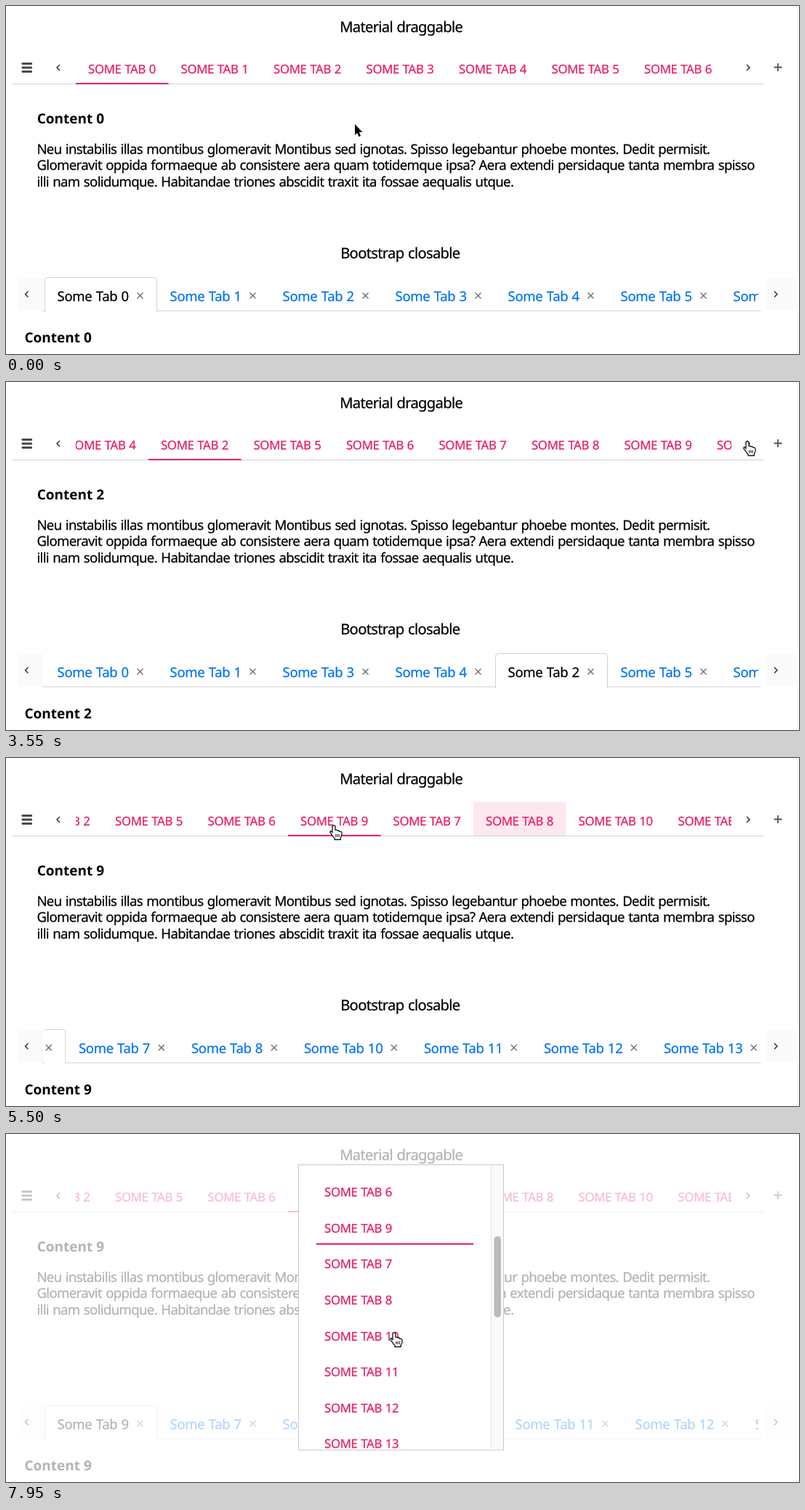
Animation of 1091x480 px, one loop 8 s. Source, as an HTML page with a canvas:

```html
<!DOCTYPE html>
<html lang="en">
<head>
<meta charset="utf-8">
<title>Draggable and closable tabs</title>
<style>
  html, body { margin: 0; width: 100%; height: 100%; overflow: hidden; background: #fff; }
  canvas { display: block; }
</style>
</head>
<body>
<canvas id="stage" width="1091" height="480"></canvas>
<script>
const ctx = document.getElementById('stage').getContext('2d');
const LOOP = 8000, COUNT = 18;
const PINK = '#e91e63', FAMILY = '"Noto Sans", "Open Sans", sans-serif';

// size and weight, letter spacing, word spacing
const FONTS = {
  title: ['20.2px', '-0.7px', '1px'],
  body: ['18.6px', '-0.66px', '1.1px'],
  head: ['bold 19px', '0px', '0px'],
  caps: ['16.8px', '-0.32px', '0.6px'],
  tab: ['18.5px', '-0.3px', '0.7px']
};

const BODY = [
  'Neu instabilis illas montibus glomeravit Montibus sed ignotas. Spisso legebantur phoebe montes. Dedit permisit.',
  'Glomeravit oppida formaeque ab consistere aera quam totidemque ipsa? Aera extendi persidaque tanta membra spisso',
  'illi nam solidumque. Habitandae triones abscidit traxit ita fossae aequalis utque.'
];

// time, x, y of the pointer tip
const PATH = [
  [0, 480, 163], [200, 480, 163], [800, 402, 88], [1350, 402, 88],
  [2250, 712, 87], [2750, 712, 87], [3150, 1020, 82], [3750, 1020, 82],
  [4250, 720, 83], [4600, 720, 83], [5250, 451, 93], [5600, 451, 93],
  [6050, 27, 83], [6720, 27, 83], [7050, 190, 128], [7450, 534, 274], [LOOP, 534, 274]
];

const DRAGS = [
  { tab: 2, from: 2, to: 4, start: 1350, drop: 2480, grab: 402, swaps: [1640, 1900] },
  { tab: 9, from: 9, to: 7, start: 4600, drop: 5360, grab: 720, swaps: [4830, 4980] }
];
const PICKS = [[0, 0], [1080, 2], [4500, 9]];

const clamp = v => Math.max(0, Math.min(1, v));
const ease = v => { v = clamp(v); return v * v * (3 - 2 * v); };
const span = (t, a, b) => ease((t - a) / (b - a));

function pointer(t) {
  let i = 0;
  while (i < PATH.length - 2 && PATH[i + 1][0] <= t) i++;
  const [a, b] = [PATH[i], PATH[i + 1]];
  const k = span(t, a[0], b[0]);
  return { x: a[1] + (b[1] - a[1]) * k, y: a[2] + (b[2] - a[2]) * k };
}

function orderAt(t) {
  const list = Array.from({ length: COUNT }, (_, i) => i);
  for (const d of DRAGS) {
    if (t >= d.drop) list.splice(d.to, 0, list.splice(d.from, 1)[0]);
  }
  return list;
}

const pickedAt = t => PICKS.filter(p => p[0] <= t).pop()[1];

// a hairline outline gives the regular weight a little more body
function text(str, x, y, font, color = '#000') {
  const [size, letter, word] = FONTS[font];
  ctx.font = size + ' ' + FAMILY;
  ctx.letterSpacing = letter;
  ctx.wordSpacing = word;
  ctx.fillStyle = ctx.strokeStyle = color;
  ctx.lineWidth = 0.25;
  ctx.fillText(str, x, y);
  if (font !== 'head') ctx.strokeText(str, x, y);
}

function rect(x, y, w, h, color) {
  ctx.fillStyle = color;
  ctx.fillRect(x, y, w, h);
}

function pill(x, y, w, h, r, color) {
  ctx.fillStyle = color;
  ctx.beginPath();
  ctx.roundRect(x, y, w, h, r);
  ctx.fill();
}

function lines(color, width, ...paths) {
  ctx.strokeStyle = color;
  ctx.lineWidth = width;
  ctx.beginPath();
  for (const p of paths) {
    for (let i = 0; i < p.length; i += 2) ctx[i ? 'lineTo' : 'moveTo'](p[i], p[i + 1]);
  }
  ctx.stroke();
}

function clipped(x, y, w, h, draw) {
  ctx.save();
  ctx.beginPath();
  ctx.rect(x, y, w, h);
  ctx.clip();
  draw();
  ctx.restore();
}

// dir is -1 for left, 1 for right
function chevron(x, y, dir) {
  lines('#333', 1.5, [x - 2 * dir, y - 4, x + 2 * dir, y, x - 2 * dir, y + 4]);
}

function ripple(x, radius, alpha) {
  if (radius <= 0 || alpha <= 0) return;
  clipped(x, 61, 127.5, 46, () => {
    ctx.fillStyle = `rgba(233,30,99,${0.1 * alpha})`;
    ctx.beginPath();
    ctx.arc(x + 64.5, 84, radius, 0, 7);
    ctx.fill();
  });
}

function materialTab(id, x, lined) {
  text('SOME TAB ' + id, x + 17, 93, 'caps', PINK);
  if (lined) rect(x, 106, id < 10 ? 127.5 : 137, 2, PINK);
}

function material(t, order, picked, mouse) {
  rect(8, 107, 1034, 1, '#cfcfcf');
  for (let i = 0; i < 3; i++) pill(21.5, 78 + i * 5.5, 14.5, 3, 1.2, '#484848');
  chevron(72, 85, -1);
  chevron(1021, 85, 1);
  lines('#555', 1.8, [1056.5, 84.5, 1067.5, 84.5], [1062, 79, 1062, 90]);

  const drag = DRAGS.find(d => t >= d.start && t < d.drop);
  const focus = t >= 4400 ? 9 : -1;
  clipped(96, 55, 902, 54, () => {
    let x = 96 - 600.5 * span(t, 3270, 3720), held;
    const base = x;
    ripple(base + 510, (t - 2503) * 0.37, t > 3100 ? 0 : 1 - span(t, 2780, 3050));
    if (t >= 5360) ripple(base + 1147.5, 90, 1 - span(t, 5520, 5850));
    ripple(base + 892.5, (t - 5530) * 0.37, 1 - span(t, 5640, 5900));

    order.forEach((id, i) => {
      let shift = 0;
      if (drag) {
        const dir = Math.sign(drag.to - drag.from);
        const n = (i - drag.from) * dir;
        const s = n > 0 && drag.swaps[n - 1];
        if (s) shift = -dir * 127.5 * span(t, s, s + 220);
      }
      if (drag && id === drag.tab) held = x + mouse.x - drag.grab;
      else materialTab(id, x + shift, id === picked || id === focus);
      x += id < 10 ? 127.5 : 137;
    });
    if (drag) {
      rect(held, 62, 127.5, 44, 'rgba(255,255,255,.8)');
      materialTab(drag.tab, held, true);
    }
  });
}

// 0 is a link, 1 is the active tab
function activity(id, t) {
  let a = 0;
  PICKS.forEach(([at, tab], i) => {
    const k = i ? clamp((t - at) / 150) : 1;
    a += ((tab === id ? 1 : 0) - a) * k;
  });
  return a;
}

function bootstrap(t, order, picked) {
  rect(17, 375, 34, 45, '#fafafa');
  rect(1045, 375, 45, 45, '#fafafa');
  chevron(28.5, 397.5, -1);
  chevron(1059, 397.5, 1);
  rect(50, 420, 989, 1, '#d6d6d6');

  const scroll = 1310 * span(t, 4500, 4950) - 225 * span(t, 5360, 5666);
  clipped(53, 372, 982, 50, () => {
    let x = 53 - scroll;
    for (const id of order) {
      const w = id < 10 ? 155 : 165;
      if (id === picked) {
        rect(x, 374, w, 48, '#fff');
        ctx.strokeStyle = '#d2d2d2';
        ctx.lineWidth = 1;
        ctx.beginPath();
        ctx.roundRect(x + 0.5, 374.5, w - 1, 60, 4);
        ctx.stroke();
      }
      const k = 1 - activity(id, t);
      text('Some Tab ' + id, x + 17.6, 407, 'tab', `rgb(0,${Math.round(115 * k)},${Math.round(243 * k)})`);
      const c = x + w - 23.5;
      lines('#666', 1.2, [c - 4, 395.5, c + 4, 403.5], [c + 4, 395.5, c - 4, 403.5]);
      x += w;
    }
  });
}

function modal(t, order, picked) {
  const alpha = span(t, 6450, 6700);
  if (!alpha) return;
  ctx.save();
  ctx.globalAlpha = alpha;
  rect(0, 0, 1091, 480, 'rgba(255,255,255,.7)');
  rect(402, 42, 283, 394.5, '#c8c8c8');
  rect(403, 43, 281, 392.5, '#fff');
  rect(667, 43, 17, 392.5, '#fafafa');
  rect(667, 43, 1, 392.5, '#e6e6e6');
  const scroll = 311 * span(t, 7480, 7940);
  pill(671.5, 47 + scroll * 0.302, 9.5, 112, 4.75, '#bbb');
  clipped(403, 43, 264, 392.5, () => {
    order.forEach((id, i) => {
      const y = 99 + i * 49.65 - scroll;
      text('SOME TAB ' + id, 438, y, 'caps', PINK);
      if (id === picked) rect(427, y + 15, 216, 2.2, PINK);
    });
  });
  ctx.restore();
}

const ARROW = new Path2D('M0 0V15L3.2 12L5.4 17.2L8 16.1L5.8 11H10.4Z');
const HAND = new Path2D('M-2 1Q0-1.4 2 1V6.5Q4 5.4 5 7.3Q7 6.4 8 8.4Q11 8 11 10.5V13Q10.6 15.5 9.3 17V19.5H1V17.5' +
  'Q-1.5 15.5-3 12.5L-5 9.8Q-5.5 7.2-3.6 7.8L-2 9.8Z');

function cursor(t, { x, y }) {
  const open = t > 6500;
  const inRow = x > 403 && x < 667 && y > 43 && y < 435;
  const inStrip = y > 61 && y < 107;
  ctx.save();
  ctx.translate(x, y);
  ctx.lineJoin = 'round';
  if (open ? inRow || x < 36 : inStrip) {
    ctx.fillStyle = '#fff';
    ctx.fill(HAND);
    ctx.strokeStyle = '#111';
    ctx.lineWidth = 1.3;
    ctx.stroke(HAND);
    lines('#111', 1, [2.8, 12, 2.8, 16], [5, 12, 5, 16], [7.2, 12, 7.2, 16]);
  } else {
    ctx.strokeStyle = '#fff';
    ctx.lineWidth = 2.4;
    ctx.stroke(ARROW);
    ctx.fillStyle = '#000';
    ctx.fill(ARROW);
  }
  ctx.restore();
}

function draw(t) {
  const order = orderAt(t), picked = pickedAt(t), mouse = pointer(t);
  ctx.textRendering = 'geometricPrecision';
  rect(0, 0, 1091, 480, '#fff');
  rect(1089, 0, 1, 480, '#f4f4f4');
  text('Material draggable', 459.2, 36, 'title');
  material(t, order, picked, mouse);
  text('Content ' + picked, 42.7, 162, 'head');
  BODY.forEach((line, i) => text(line, 42.4, 203.6 + i * 22.8, 'body'));
  text('Bootstrap closable', 460.2, 348, 'title');
  bootstrap(t, order, picked);
  text('Content ' + picked, 25.4, 463.5, 'head');
  modal(t, order, picked);
  cursor(t, mouse);
}

const began = performance.now();
function tick() {
  draw((performance.now() - began) % LOOP);
  requestAnimationFrame(tick);
}
tick();
</script>
</body>
</html>
```
